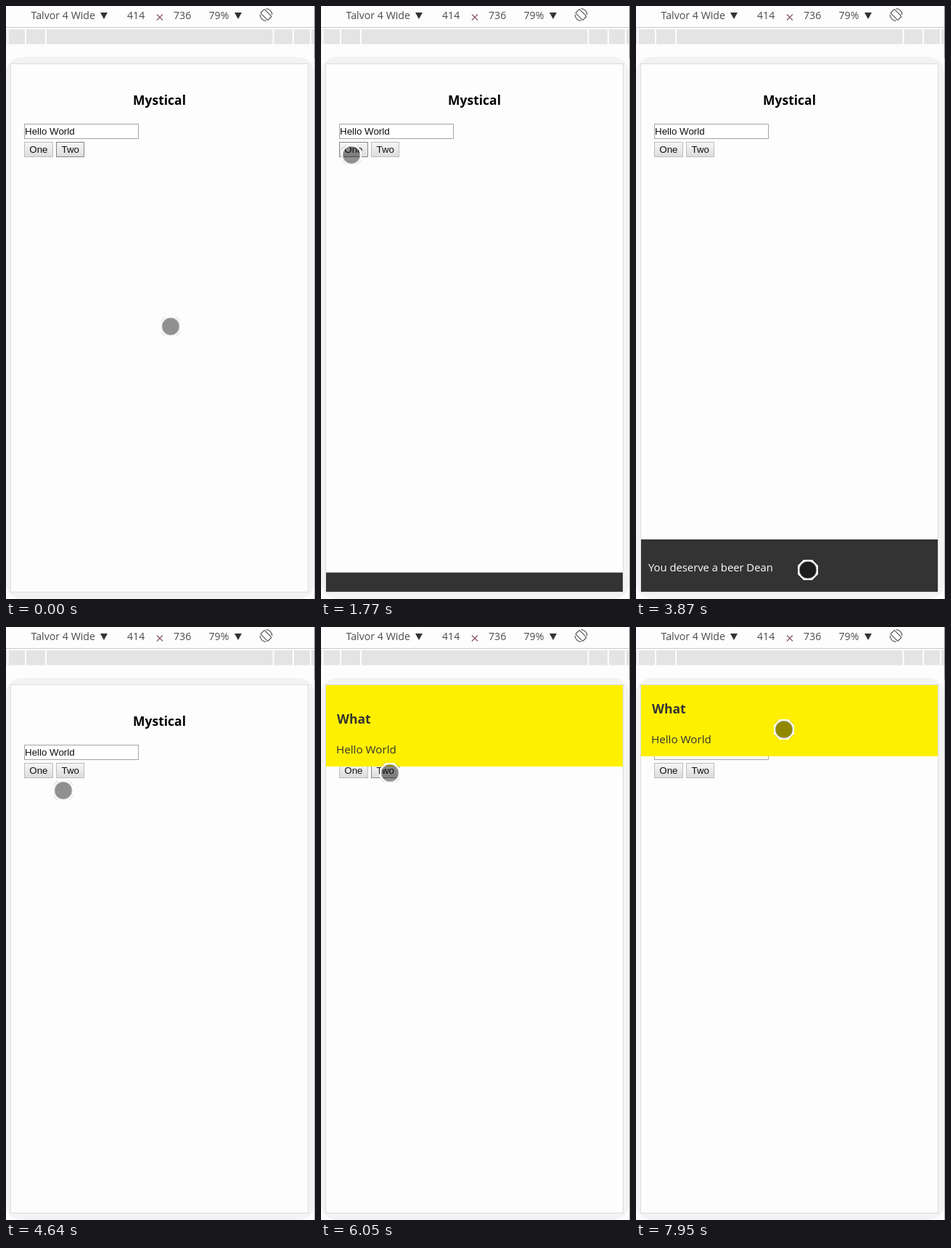
An HTML page that plays this animation: 426x816 px, repeating every 7990 ms.

```html
<!DOCTYPE html>
<html lang="en">
<head>
<meta charset="utf-8">
<title>Toast demo</title>
<style>
  html, body { margin: 0; width: 100%; height: 100%; overflow: hidden; background: #fdfdfd; }
  svg { display: block; }
  .ui { font-family: "Open Sans", "Noto Sans", sans-serif; }
  .bar { font-size: 14.2px; fill: #4c4c4c; }
  .head { font-size: 17.5px; font-weight: 700; }
  .form { font: 13.333px "Liberation Sans", Arial, sans-serif; fill: #111; }
  .btn { fill: url(#up); stroke: #bcbcbc; }
  .btn.focus { stroke: #858585; }
  .btn.active { fill: url(#down); }
</style>
</head>
<body>
<svg width="426" height="816" viewBox="0 0 426 816">
  <defs>
    <linearGradient id="up" x2="0" y2="1">
      <stop stop-color="#f6f6f6"/><stop offset="1" stop-color="#dcdcdc"/>
    </linearGradient>
    <linearGradient id="down" x2="0" y2="1">
      <stop stop-color="#d8d8d8"/><stop offset="1" stop-color="#ececec"/>
    </linearGradient>
    <clipPath id="screen"><rect x="7" y="80" width="409" height="726"/></clipPath>
  </defs>

  <!-- toolbar -->
  <rect width="426" height="816" fill="#fdfdfd"/>
  <g class="ui bar">
    <text x="34.5" y="18">Talvor 4 Wide</text>
    <text x="167" y="18">414</text>
    <text x="231" y="18">736</text>
    <text x="279.5" y="18">79%</text>
  </g>
  <path d="M130 9h10l-5 9zM315 9h10l-5 9z" fill="#333"/>
  <path d="M208 11.5l8 8m0-8l-8 8" stroke="#8a5560" stroke-width="1.2"/>
  <g transform="translate(358.5 12)" fill="none" stroke="#555" stroke-width="1.2">
    <rect x="-3.8" y="-7" width="7.6" height="14" rx="1" transform="rotate(-45)"/>
    <path d="M0-8.3A8.3 8.3 0 0 1 8.3 0M0 8.3A8.3 8.3 0 0 1-8.3 0"/>
  </g>
  <rect y="29" width="425" height="1" fill="#c9c9c9"/>
  <rect y="32" width="425" height="20.5" fill="#e4e4e4"/>
  <path d="M2.5 32v21M27 32v21M55 32v21M368.5 32v21M396 32v21M420 32v21" stroke="#fdfdfd" stroke-width="2"/>

  <!-- device -->
  <rect y="70" width="425" height="746" rx="22" fill="#f3f3f3"/>
  <rect x="6.5" y="79.5" width="410" height="727" fill="#fdfdfd" stroke="#dcdcdc"/>
  <path d="M425.5 0V72" stroke="#808080"/>
  <path d="M425.5 72V816" stroke="#b0b0b0"/>

  <!-- page -->
  <text class="ui head" x="211.5" y="136" text-anchor="middle">Mystical</text>
  <rect x="25.5" y="162.5" width="157" height="20" fill="#fff" stroke="#a4a4a4"/>
  <text class="form" x="26" y="177">Hello World</text>
  <rect id="one" class="btn" x="25.5" y="187.5" width="39" height="20"/>
  <rect id="two" class="btn" x="69.5" y="187.5" width="38" height="20"/>
  <text class="form" x="32.3" y="202">One</text>
  <text class="form" x="76.5" y="202">Two</text>

  <g clip-path="url(#screen)" class="ui">
    <g id="bottom">
      <rect x="7" y="734" width="409" height="72" fill="#333"/>
      <text x="17" y="778" font-size="14.8" fill="#fff">You deserve a beer Dean</text>
    </g>
    <g id="top" fill="#333">
      <rect x="7" y="80" width="409" height="112" fill="#fff000"/>
      <text class="head" x="22" y="133">What</text>
      <text x="21" y="174" font-size="15.2">Hello World</text>
    </g>
  </g>

  <!-- touch pointer, centred on 0,0 -->
  <g id="touch">
    <path d="M-6-14H6L14-6V6L6 14H-6L-14 6V-6zM12 0A12 12 0 1 0-12 0A12 12 0 1 0 12 0z" fill="#fdfdfd" fill-rule="evenodd"/>
    <path d="M-13.5-7.5l6-6M13.5-7.5l-6-6M-13.5 7.5l6 6M13.5 7.5l-6 6" stroke="#000" stroke-opacity=".22" stroke-width=".8"/>
    <circle r="12" fill="#000" fill-opacity=".43"/>
    <circle r="12" fill="none" stroke="#c4c4c4" stroke-width="1"/>
  </g>
</svg>
<script>
const LOOP = 7990;
const $ = id => document.getElementById(id);

// [first, last, count]: the screen refreshes in bursts and holds between them
const bursts = [
  [300, 840, 10], [1720, 2000, 6], [2620, 3380, 14], [3440, 3500, 2], [3870, 4040, 4],
  [4220, 5000, 14], [5620, 6050, 8], [6360, 6760, 8], [7900, 7950, 2]
];

function snap(t) {
  let held = 0;
  for (const [a, b, n] of bursts) {
    for (let i = 0; i < n; i++) {
      const at = Math.floor((a + (b - a) * i / (n - 1)) / 10) * 10;
      if (at <= t) held = at;
    }
  }
  return held;
}

const clamp = u => Math.min(1, Math.max(0, u));

function bezier(x1, y1, x2, y2) {
  const curve = (a, b, u) => 3 * a * u * (1 - u) ** 2 + 3 * b * u * u * (1 - u) + u ** 3;
  return x => {
    let lo = 0, hi = 1;
    for (let i = 0; i < 24; i++) {
      const mid = (lo + hi) / 2;
      if (curve(x1, x2, mid) < x) lo = mid; else hi = mid;
    }
    return curve(y1, y2, hi);
  };
}
const ease = bezier(.25, .1, .25, 1);
const easeIn = bezier(.42, 0, 1, 1);
const smooth = bezier(.42, 0, .58, 1);
const start = u => u ** 1.4;
const stop = u => 1 - (1 - u) ** 1.4;
const linear = u => u;

// [time, x, y, easing towards this point]
const path = [
  [0, 227, 441, linear], [245, 227, 441, linear], [840, 42, 205, smooth],
  [2560, 42, 205, linear], [2850, 92, 367, start], [3380, 222, 775, stop],
  [3500, 237, 776, linear], [4160, 237, 776, linear], [4640, 79, 225, smooth],
  [4760, 78, 214, linear], [5000, 95, 201, smooth],
  [6300, 95, 201, linear], [6760, 204, 141, smooth], [LOOP, 204, 141, linear]
];

function pointer(t) {
  const i = Math.max(1, path.findIndex(p => p[0] >= t));
  const [t0, x0, y0] = path[i - 1], [t1, x1, y1, f] = path[i];
  const u = f(clamp((t - t0) / (t1 - t0)));
  return [x0 + (x1 - x0) * u, y0 + (y1 - y0) * u];
}

// how far a toast is shown, 0 to 1
const shown = (t, open, close) =>
  ease(clamp((t - open) / 300)) - easeIn(clamp((t - close) / 170));

const move = (id, x, y) => $(id).setAttribute("transform", `translate(${x.toFixed(2)} ${y.toFixed(2)})`);
const within = (t, a, b) => t >= a && t < b;

function button(id, focus, active) {
  $(id).classList.toggle("focus", focus);
  $(id).classList.toggle("active", active);
}

function draw(t) {
  const s = snap(t);
  move("touch", ...pointer(s));
  move("bottom", 0, 72.5 * (1 - shown(s, 1700, 3870)));
  move("top", 0, -112.5 * (1 - shown(s, 5720, 7900)));
  button("one", within(t, 1530, 3870), within(t, 1530, 1720));
  button("two", t < 1530 || within(t, 5620, 7900), within(t, 5620, 5740));
}

const begin = performance.now();
function tick() {
  draw((performance.now() - begin) % LOOP);
  requestAnimationFrame(tick);
}
tick();
</script>
</body>
</html>
```
